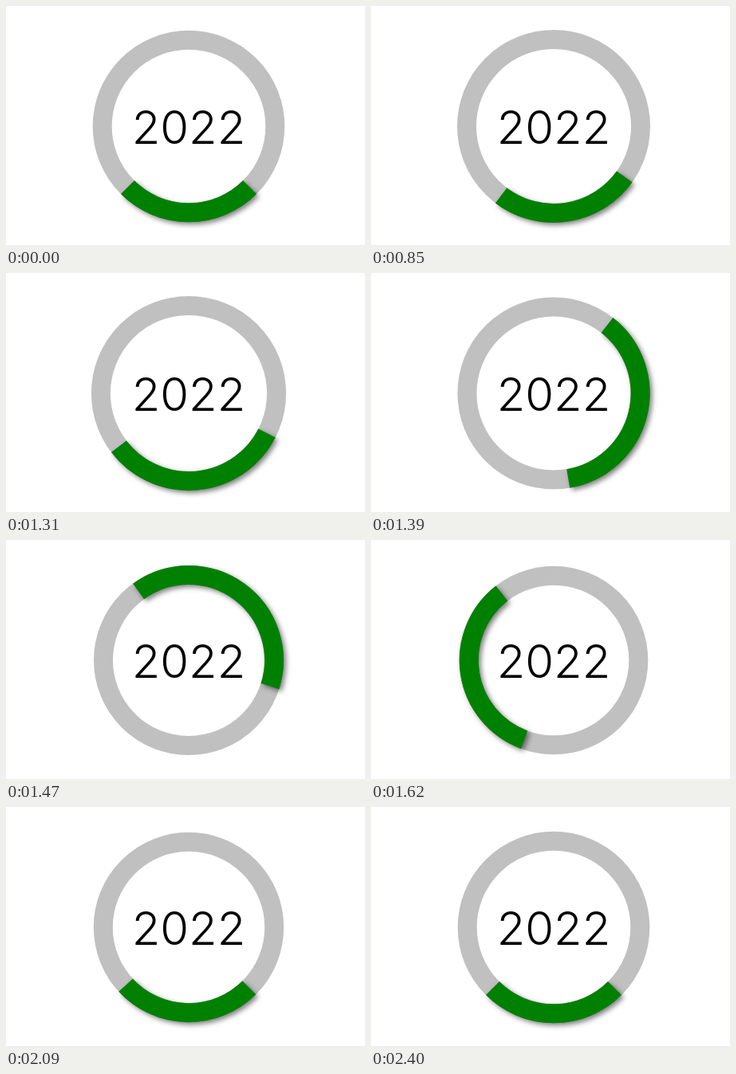
An HTML page for the animation above (2470 ms loop, 450 by 300 pixels).

```html
<!DOCTYPE html>
<html lang="en">
<head>
<meta charset="utf-8">
<title>2022 ring</title>
<style>
  html, body { margin: 0; width: 100%; height: 100%; overflow: hidden; background: #fff; }
  svg { display: block; width: 450px; height: 300px; }
  .ring { fill: none; stroke-width: 24; }
  #track { stroke: silver; }
  #arc { stroke: green; filter: drop-shadow(3px 3px 3px rgba(0, 0, 0, .5)); }
  text { font: 350 58px Inter, Lato, sans-serif; text-anchor: middle; }
</style>
</head>
<body>
<svg viewBox="0 0 450 300">
  <circle id="track" class="ring" cx="229" cy="151" r="108.3"/>
  <path id="arc" class="ring"/>
  <text x="229" y="173">2022</text>
</svg>
<script>
  const LOOP = 2470, REST = 850, STEP = 77.5, LAST = 20;
  const CX = 229, CY = 151, RADIUS = 108.3;
  const track = document.getElementById('track');
  const arc = document.getElementById('arc');

  // Monotone cubic curve through [step, value] knots, flat at both ends.
  function curve(knots) {
    const slope = i => (knots[i + 1][1] - knots[i][1]) / (knots[i + 1][0] - knots[i][0]);
    const tangents = knots.map((_, i) => {
      if (i === 0 || i === knots.length - 1) return 0;
      const a = slope(i - 1), b = slope(i);
      return a * b > 0 ? 2 * a * b / (a + b) : 0;
    });
    return x => {
      if (x <= knots[0][0]) return knots[0][1];
      const i = knots.findIndex(k => k[0] >= x) - 1;
      if (i < 0) return knots[knots.length - 1][1];
      const [x0, y0] = knots[i], [x1, y1] = knots[i + 1];
      const h = x1 - x0, u = (x - x0) / h, v = 1 - u;
      return y0 * v * v * (1 + 2 * u) + y1 * u * u * (3 - 2 * u)
        + h * u * v * (tangents[i] * v - tangents[i + 1] * u);
    };
  }

  // Both ends make two counter-clockwise turns; the tail lags behind the head.
  const headTurn = curve([[-1, 0], [0, 9.5], [6, 378], [8, 531], [12, 720]]);
  const tailTurn = curve([[-1, 0], [0, 7.8], [6, 352.3], [8, 477.3], [12, 711], [16, 717.6], [20, 720]]);
  const swell = curve([[-1, 0], [0, 0.7], [5, 2], [6, 1.8], [8, -1.3], [12, -2.3], [16, -1.1], [20, 0]]);

  function point(deg, r) {
    const a = deg * Math.PI / 180;
    return `${(CX + r * Math.cos(a)).toFixed(3)} ${(CY + r * Math.sin(a)).toFixed(3)}`;
  }

  function draw(time) {
    const t = time % LOOP;
    // Motion is held for each step.
    const step = t < REST ? -1 : Math.min(LAST, Math.floor((t - REST + 8) / STEP));
    const r = RADIUS + swell(step);
    track.setAttribute('r', r);
    arc.setAttribute('d',
      `M${point(45 - headTurn(step), r)} A${r} ${r} 0 0 1 ${point(135 - tailTurn(step), r)}`);
  }

  const start = performance.now();
  function tick() {
    draw(performance.now() - start);
    requestAnimationFrame(tick);
  }
  tick();
</script>
</body>
</html>
```
